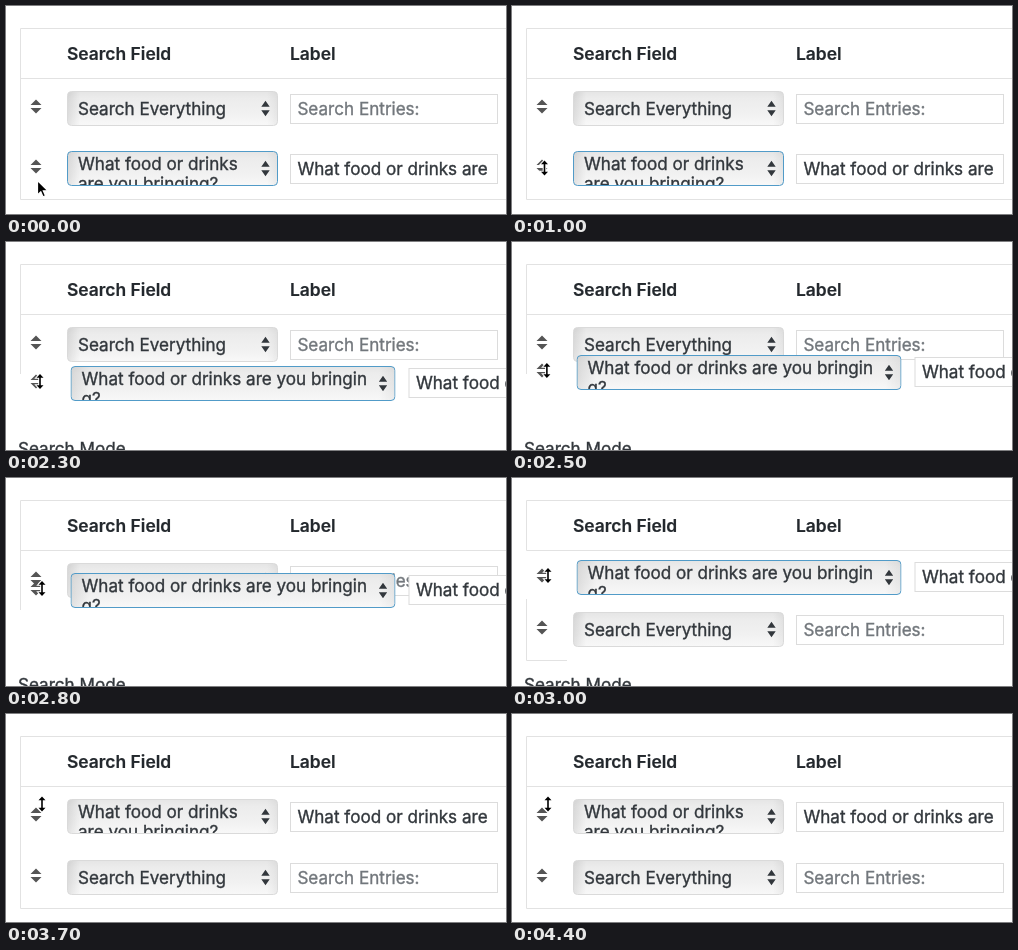
An HTML page for the animation above (5.2 s loop, 500 px wide and 208 px high).

```html
<!DOCTYPE html>
<html lang="en">
<head>
<meta charset="utf-8">
<title>Sortable search fields</title>
<style>
  html, body { margin: 0; width: 100%; height: 100%; overflow: hidden; background: #fff; }
  svg { display: block; }
  text { font: 17.1px Inter, Roboto, sans-serif; fill: #32373c; stroke: #32373c; stroke-width: .35px; white-space: pre; }
  .head { font-size: 17.45px; font-weight: 600; fill: #23282d; stroke: #23282d; stroke-width: .2px; }
  .hint { fill: #72777c; stroke: #72777c; }
  .line { fill: none; stroke: #e2e2e2; }
  .box { fill: #fff; stroke: #dcdcdc; }
</style>
</head>
<body>
<svg id="stage" width="500" height="208" viewBox="0 0 500 208">
  <defs>
    <linearGradient id="sides">
      <stop offset="0" stop-color="#000" stop-opacity=".09"/>
      <stop offset=".06" stop-color="#000" stop-opacity="0"/>
      <stop offset=".95" stop-color="#000" stop-opacity="0"/>
      <stop offset="1" stop-color="#000" stop-opacity=".05"/>
    </linearGradient>
    <linearGradient id="face" x2="0" y2="1">
      <stop offset="0" stop-color="#e5e5e5"/>
      <stop offset=".2" stop-color="#ececec"/>
      <stop offset=".65" stop-color="#f1f1f1"/>
      <stop offset="1" stop-color="#f8f8f8"/>
    </linearGradient>
  </defs>
  <g id="scene"></g>
</svg>
<script>
const LOOP = 5200, STEP = 100;
const GRAB = 1000, LIFT = 1900, SWAP = 2900, DROP = 3700;
const scene = document.getElementById('scene');

// time, pointer x, top of the dragged select
const dragPath = [
  [1900, 32, 140], [2300, 34, 124], [2400, 34.5, 119],
  [2800, 36, 95], [3000, 36, 82], [3200, 36, 74]
];
const arrowPath = [[300, 31, 174], [700, 27, 160]];

function along(path, t) {
  if (t <= path[0][0]) return path[0].slice(1);
  for (let i = 1; i < path.length; i++) {
    const [t0, x0, y0] = path[i - 1], [t1, x1, y1] = path[i];
    if (t <= t1) {
      const k = (t - t0) / (t1 - t0);
      return [x0 + (x1 - x0) * k, y0 + (y1 - y0) * k];
    }
  }
  return path[path.length - 1].slice(1);
}

const label = (x, y, s, cls = '') => `<text x="${x}" y="${y}" class="${cls}">${s}</text>`;
const line = d => `<path class="line" d="${d}"/>`;

// pair of triangles pointing up and down
const sorter = (x, y, w, h, gap, fill) =>
  `<path fill="${fill}" d="M${x - w} ${y - gap}h${2 * w}l${-w} ${-h}z` +
  `M${x - w} ${y + gap}h${2 * w}l${-w} ${h}z"/>`;

const handle = (x, y) => sorter(x, y, 5.5, 5.5, 1.5, '#555');

function select(x, y, w, lines, focused) {
  const base = lines.length > 1 ? 19 : 24;
  const h = 35;
  const shape = (fill, stroke) =>
    `<rect x=".5" y=".5" width="${w - 1}" height="${h - 1}" rx="4" fill="${fill}" stroke="${stroke}"/>`;
  return `<svg x="${x}" y="${y}" width="${w}" height="${h}">` +
    shape('url(#face)', 'none') + shape('url(#sides)', 'none') +
    lines.map((s, i) => label(11, base + i * 20, s)).join('') +
    sorter(w - 12.5, 17.5, 4.2, 6, 1.8, '#32373c') +
    shape('none', focused ? '#519bc8' : '#dadada') + '</svg>';
}

function input(x, y, s, cls) {
  return `<rect class="box" x="${x + .5}" y="${y + .5}" width="207" height="29"/>` +
    label(x + 7.4, y + 21, s, cls);
}

const everythingRow = top =>
  handle(30, top + 15.5) + select(61, top, 211, ['Search Everything']) +
  input(284, top + 3, 'Search Entries:', 'hint');

const foodRow = (top, focused) =>
  handle(30, top + 15.5) +
  select(61, top, 211, ['What food or drinks', 'are you bringing?'], focused) +
  input(284, top + 3, 'What food or drinks are');

function draggedRow(px, top) {
  const x = 63 + Math.min(1.5, (px - 32) * .75);
  return handle(x - 34.5, top + 15.5) +
    select(x, top, 325, ['What food or drinks are you bringin', 'g?'], true) +
    input(x + 338, top + 2, 'What food or drinks are');
}

const arrowCursor = (x, y) =>
  `<path transform="translate(${x} ${y})" fill="#000" stroke="#fff" stroke-width="1.2"
    d="M.5 .5V15l3.3-3.2 2.2 5 2.5-1.1-2.2-4.9h4.6z"/>`;

const resizeCursor = (x, y) =>
  `<path transform="translate(${x} ${y})" fill="#000" stroke="#fff" stroke-width="2" paint-order="stroke"
    d="M0-7.5L3.5-3.7H.8v7.4H3.5L0 7.5-3.5 3.7h2.7v-7.4h-2.7z"/>`;

function frame(t) {
  const dragging = t >= LIFT && t < DROP;
  const swapped = t >= SWAP;
  let out = label(61, 54, 'Search Field', 'head') + label(284, 54, 'Label', 'head') +
    line('M500 22.5H14.5V72.5H500');

  if (dragging) {
    const [px, top] = along(dragPath, t);
    out += label(12, 212.5, 'Search Mode') +
      line(swapped ? 'M14.5 121V182.5H55' : 'M14.5 72V132') +
      everythingRow(swapped ? 134 : 85) +
      draggedRow(px, top) + resizeCursor(px, top + 15.5);
  } else {
    const bottom = swapped ? 194.5 : 193.5;
    out += line(`M14.5 72V${bottom}H500`);
    if (swapped) out += foodRow(85) + everythingRow(146) + resizeCursor(36, 90);
    else {
      out += everythingRow(85) + foodRow(145, true);
      out += t < GRAB ? arrowCursor(...along(arrowPath, t)) : resizeCursor(32.5, 162);
    }
  }
  return out;
}

let shown = -1;
function tick() {
  const t = Math.floor(performance.now() % LOOP / STEP) * STEP;
  if (t !== shown) scene.innerHTML = frame(shown = t);
  requestAnimationFrame(tick);
}
tick();
</script>
</body>
</html>
```
